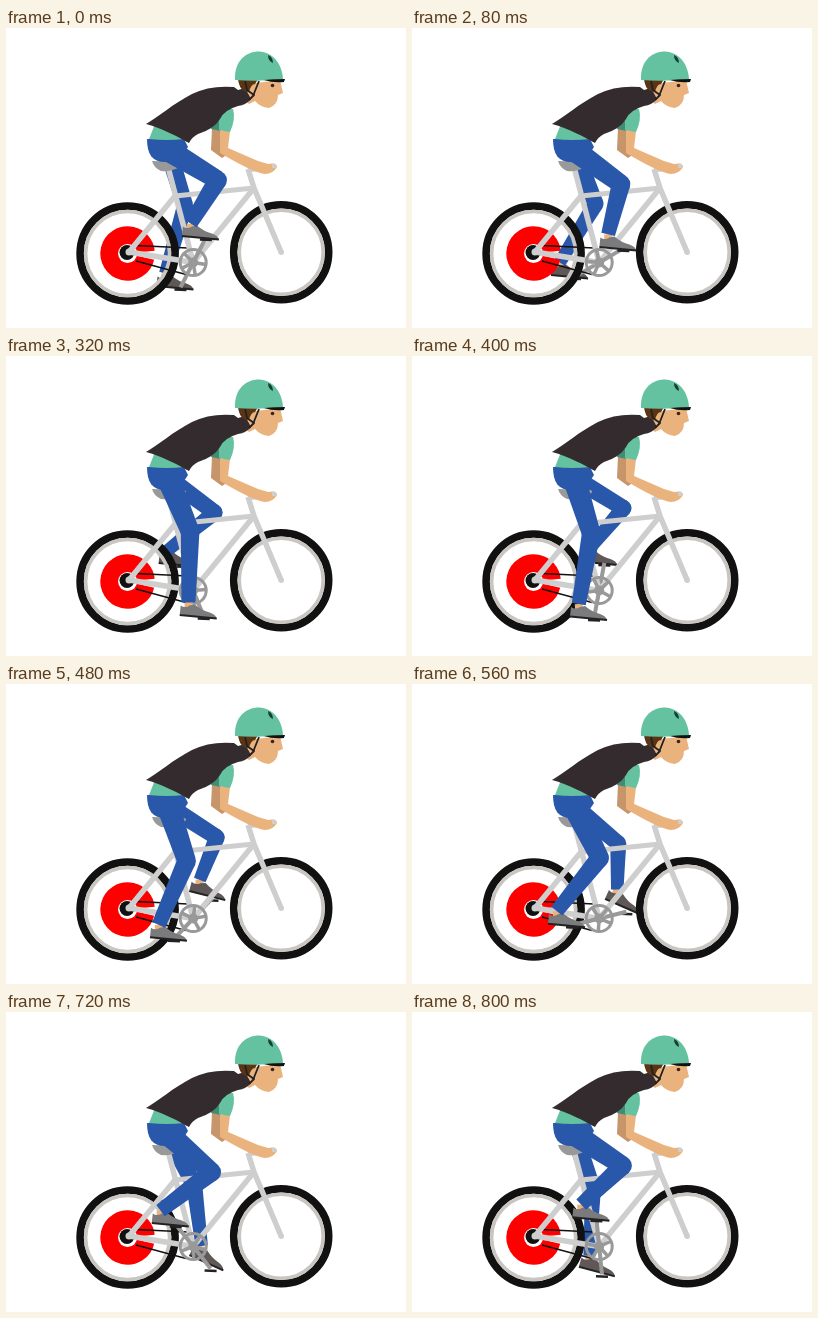
These frames come from a looping animation (400x300 px, 880 ms). An HTML page with a canvas:

```html
<!DOCTYPE html>
<html lang="en">
<head>
<meta charset="utf-8">
<title>Cyclist</title>
<style>
html, body { margin: 0; width: 100%; height: 100%; overflow: hidden; background: #fff; }
canvas { display: block; width: 400px; height: 300px; }
</style>
</head>
<body>
<canvas id="stage" width="400" height="300"></canvas>
<script>
const ctx = document.getElementById('stage').getContext('2d');
const STEP = 80, POSES = 11, RAD = Math.PI / 180;
const BLUE = '#2957a9', FRAME = '#cecece', GREY = '#999', SKIN = '#eab27d',
      TEAL = '#64c2a1', BLACK = '#111', VEST = '#332b2d';
const HIP = [162, 122], CRANK = [187.2, 234.5], REAR = [121.6, 225.5], FRONT = [275.2, 224.3];
const NEAR_LEG = { hip: 11.5, knee: 9.3, ankle: 7, tilt: 0, shoe: '#7b7b7d' };
const FAR_LEG = { hip: 9, knee: 8, ankle: 6.2, tilt: 22, shoe: '#5f5857' };

const polar = ([x, y], r, deg) => [x + r * Math.cos(deg * RAD), y + r * Math.sin(deg * RAD)];

function fill(path, color) {
  ctx.fillStyle = color;
  ctx.fill(new Path2D(path));
}

function line(color, width, ...points) {
  ctx.strokeStyle = color;
  ctx.lineWidth = width;
  ctx.beginPath();
  for (const p of points) ctx.lineTo(...p);
  ctx.stroke();
}

function dot([x, y], r, color) {
  ctx.fillStyle = color;
  ctx.beginPath();
  ctx.arc(x, y, r, 0, 7);
  ctx.fill();
}

function ring([x, y], r, width, color, from = 0, to = 360) {
  ctx.strokeStyle = color;
  ctx.lineWidth = width;
  ctx.beginPath();
  ctx.arc(x, y, r, from * RAD, to * RAD);
  ctx.stroke();
}

// Limb segment that narrows from radius ra at a to rb at b
function taper(a, ra, b, rb, color) {
  const deg = Math.atan2(b[1] - a[1], b[0] - a[0]) / RAD;
  const corners = [polar(a, ra, deg + 90), polar(b, rb, deg + 90),
                   polar(b, rb, deg - 90), polar(a, ra, deg - 90)];
  fill('M' + corners.join('L') + 'Z', color);
}

const pedalAt = turn => polar(CRANK, 28, turn - 90);

function leg(turn, size) {
  const [x, y] = pedalAt(turn);
  const knee = polar(HIP, 58, 52 - 21 * Math.cos((turn - 20) * RAD));
  // the foot tips around its toe on the forward stroke
  const tilt = size.tilt * Math.max(0, Math.cos((turn - 110) * RAD));
  const toe = [x + 13, y + 1];
  const ankle = polar(toe, 32, 208 + tilt), heel = polar(toe, 29, 196 + tilt);
  line('#222', 2.5, [x - 6, y + 2], [x + 6, y + 2.5]);
  taper(ankle, 4, heel, 4, SKIN);
  ctx.save();
  ctx.translate(...toe);
  ctx.rotate(tilt * RAD);
  fill('M-36 -12Q-32 -9 -27 -12L-22 -13Q-15 -7 -7 -5Q-1 -3 0 1L-37 -3Z', size.shoe);
  line('#222', 2, [-37, -2.5], [0, 1]);
  ctx.restore();
  taper(HIP, size.hip, knee, size.knee, BLUE);
  dot(knee, size.knee, BLUE);
  taper(knee, size.knee, ankle, size.ankle, BLUE);
}

function crankArm(turn) {
  line(GREY, 4, CRANK, pedalAt(turn));
}

function wheel(center) {
  ring(center, 47.5, 7.6, BLACK);
  ring(center, 42, 3.6, '#c9c6c1');
}

function bike(turn) {
  wheel(REAR);
  wheel(FRONT);
  ring(REAR, 18, 18.5, '#f00', 13, 354);
  dot(REAR, 9.5, '#fff');
  dot([121, 224.5], 7.5, BLACK);
  line(BLACK, 1.3, [130, 217.5], [182, 220]);
  line(BLACK, 1.3, [130, 233], [180, 246.5]);
  const seat = [169, 168], head = [248, 160], hub = [123, 224];
  line(FRAME, 5.5, seat, hub, CRANK);
  line(FRAME, 5.5, [162, 139], CRANK);
  line(FRAME, 5, seat, head);
  line(FRAME, 5.5, head, CRANK);
  line(FRAME, 5.5, [242, 141], head, FRONT);
  line(FRAME, 5, [242, 142], [269, 138]);
  dot(hub, 3.5, FRAME);
  dot(FRONT, 2.7, FRAME);
  fill('M146 133L179 134Q183 137 174 139Q165 144 155 143Q148 140 146 133Z', GREY);
  ring(CRANK, 13, 3, GREY);
  for (let i = 0; i < 5; i++) line(GREY, 3.5, CRANK, polar(CRANK, 13, turn - 90 + i * 72));
  dot(CRANK, 5, GREY);
}

function body() {
  // hips, shirt and far arm
  fill('M141 111C141 127 147 135 161 134L174 131L182 119L178 111Z', BLUE);
  fill('M149 96L143 111Q160 113 179 111L184 106Z', TEAL);
  fill('M206 100L215 102L214 119L222 126L216 130L205 122Z', '#c69569');
  fill('M208 91L216 92L215 103L205 101Z', '#3f8d74');
  // near arm and hand
  fill('M214 102L224 103L222 120L252 133L262 136Q271 134 271 139Q267 146 259 146Q248 145 214 125Z', SKIN);
  line(FRAME, 4, [266, 138], [270, 138]);
  fill('M213 88Q220 79 227 81Q230 91 224 104L213 102Z', TEAL);
  // neck and face
  fill('M242 56L274 52L277 65L272 67Q272 77 263 80Q254 79 249 73L243 76L233 66Z', SKIN);
  fill('M140 96C151 90 168 75 186 66Q204 57 228 59L232 62L239 60L245 71Q240 77 232 78Q218 82 214 91Q208 101 192 106Q186 109 183 115C174 110 156 100 140 96Z', VEST);
  // hair, straps and eye
  fill('M232 51L252 51L249 56Q245 56 243 64L238 63Q233 60 232 51Z', '#5a3413');
  line('#222', 1.8, [239, 53], [241, 62], [248, 67], [243, 72]);
  line('#222', 1.8, [253, 53], [249, 63], [247, 68]);
  dot([266.5, 57.5], 1.8, '#3a2418');
  // helmet
  fill('M229 52C228 34 239 23.5 253 23.5C267 24 276 36 277 51Q253 54 229 52Z', TEAL);
  fill('M258 52Q268 51 279 51L278 54Q267 55 258 52Z', BLACK);
  fill('M262 27Q267 29 267 35Q262 33 262 27Z', '#173f35');
}

function draw(now) {
  const pose = Math.floor(now / STEP) % POSES;
  const turn = 27 + pose * 360 / POSES;
  ctx.clearRect(0, 0, 400, 300);
  ctx.lineJoin = 'round';
  leg(turn + 180, FAR_LEG);
  crankArm(turn + 180);
  bike(turn);
  crankArm(turn);
  leg(turn, NEAR_LEG);
  body();
}

const start = performance.now();
function tick() {
  draw(performance.now() - start);
  requestAnimationFrame(tick);
}
tick();
</script>
</body>
</html>
```
